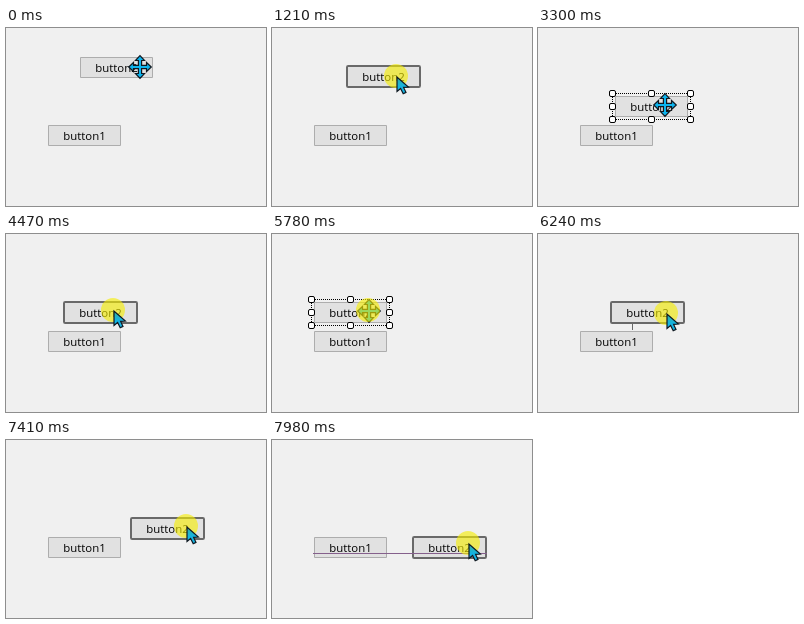
Animation of 260 by 178 pixels, one loop 8 s. Source, as an HTML page with a canvas:

```html
<!DOCTYPE html>
<html lang="en">
<head>
<meta charset="utf-8">
<title>Dragging a button with snap lines</title>
<style>
html, body { margin: 0; width: 100%; height: 100%; overflow: hidden; background: #f0f0f0; }
canvas { display: block; }
</style>
</head>
<body>
<canvas id="stage" width="260" height="178"></canvas>
<script>
const ctx = document.getElementById('stage').getContext('2d');
const LOOP = 8000, W = 75, H = 23, SNAP = 7.5;
const fixed = { x: 41, y: 96 };
const GAP_Y = fixed.y - H - 6;

// The pointer rests between these strokes
const home = { x: 133, y: 38 };
const strokes = [
  { from: 20, to: 130, x: 123, y: 39 },
  { from: 850, to: 1550, x: 124, y: 56 },
  { from: 1700, to: 1880, x: 126, y: 67 },
  { from: 2100, to: 2280, x: 126, y: 71 },
  { from: 3299, to: 3300, x: 126, y: 76 },
  { from: 3930, to: 4770, x: 96, y: 76 },
  { from: 5890, to: 6790, x: 178, y: 84 },
  { from: 7350, to: 7980, x: 196, y: 103 }
];

// x, y: resting place before the drag; dx, dy: grab offset
const drags = [
  { press: 330, from: 870, to: 3300, x: 73, y: 28, dx: 50, dy: 11, gap: true },
  { press: 3940, from: 3940, to: 5410, x: 76, y: GAP_Y, dx: 50, dy: 9, gap: false },
  { press: 5780, from: 5920, to: LOOP, x: fixed.x, y: GAP_Y, dx: 56, dy: 9, gap: true }
];

function pointerAt(t) {
  let { x, y } = home;
  for (const s of strokes) {
    const k = Math.min(1, Math.max(0, (t - s.from) / (s.to - s.from)));
    x += (s.x - x) * k;
    y += (s.y - y) * k;
  }
  return { x: Math.round(x), y: Math.round(y) };
}

function snap(pointer, drag) {
  let x = pointer.x - drag.dx, y = pointer.y - drag.dy;
  const left = Math.abs(x - fixed.x) < SNAP;
  if (left) x = fixed.x;
  const gap = x < fixed.x + W && Math.abs(y - GAP_Y) < SNAP;
  const base = !gap && Math.abs(y - fixed.y) < SNAP;
  if (gap) y = GAP_Y;
  if (base) y = fixed.y;
  return { x, y, left, gap: gap && drag.gap, base };
}

function rect(x, y, w, h, color) {
  ctx.fillStyle = color;
  ctx.fillRect(x, y, w, h);
}

function button(x, y, label, dragged) {
  const inset = dragged ? 1 : 1.5;
  ctx.beginPath();
  ctx.roundRect(x + inset, y + inset, W - 2 * inset, H - 2 * inset, dragged ? 1.2 : 0);
  ctx.fillStyle = '#e1e1e1';
  ctx.fill();
  ctx.lineWidth = dragged ? 2 : 1;
  ctx.strokeStyle = dragged ? '#696969' : '#adadad';
  ctx.stroke();
  ctx.fillStyle = '#000';
  ctx.font = '500 11.4px "Open Sans", "Noto Sans", sans-serif';
  ctx.textAlign = 'center';
  ctx.fillText(label, x + W / 2, y + 16);
}

function selection(x, y) {
  ctx.lineWidth = 1;
  ctx.strokeStyle = '#000';
  ctx.setLineDash([1, 1]);
  ctx.lineDashOffset = 0.5;
  ctx.strokeRect(x - 1.5, y - 1.5, W + 3, H + 3);
  ctx.setLineDash([]);
  ctx.fillStyle = '#fff';
  for (const i of [0, 1, 2]) for (const j of [0, 1, 2]) {
    if (i === 1 && j === 1) continue;
    ctx.beginPath();
    ctx.roundRect(x - 4.5 + i * 39, y - 4.5 + j * 13, 6, 6, 1.5);
    ctx.fill();
    ctx.stroke();
  }
}

function snapLines({ x, y, left, gap, base }) {
  const gray = '#686868';
  if (left) for (const lx of [x, x + W - 1]) rect(lx, y, 1, fixed.y + H - y, gray);
  else if (gap) rect(Math.floor((Math.max(x, fixed.x) + Math.min(x, fixed.x) + W) / 2), y + H, 1, 6, gray);
  if (base) rect(fixed.x, y + 17, x + W - fixed.x, 1, '#85608c');
}

function shape(points, x, y, fill) {
  ctx.beginPath();
  for (const [px, py] of points) ctx.lineTo(x + px, y + py);
  ctx.closePath();
  ctx.fillStyle = fill;
  ctx.strokeStyle = '#101820';
  ctx.lineWidth = 1.2;
  ctx.fill();
  ctx.stroke();
}

const arrow = [[1, 1], [1, 15.5], [4.6, 12.5], [7.2, 17.7], [10, 16.4], [7.6, 11.4], [12.4, 11]];
const arm = [[-1.6, -1.6], [-1.6, -6.5], [-4.5, -6.5], [0, -11.3], [4.5, -6.5], [1.6, -6.5]];
const cross = [0, 1, 2, 3].flatMap(q => arm.map(([x, y]) =>
  [[x, y], [-y, x], [-x, -y], [y, -x]][q]));

function arrowCursor({ x, y }) {
  const fill = ctx.createLinearGradient(x, y, x, y + 18);
  fill.addColorStop(0, '#3aae98');
  fill.addColorStop(0.6, '#14b4e4');
  shape(arrow, x, y, fill);
}

function moveCursor({ x, y }) {
  shape(cross, x + 1, y + 1, '#0cb4ee');
}

function glow({ x, y }) {
  ctx.fillStyle = 'rgba(245, 238, 0, 0.62)';
  ctx.beginPath();
  ctx.arc(x, y, 12, 0, 2 * Math.PI);
  ctx.fill();
}

function draw(now) {
  const t = now % LOOP;
  const pointer = pointerAt(t);
  const drag = drags.find(d => t < d.to);
  const dragging = t >= drag.from;
  const pos = dragging ? snap(pointer, drag) : drag;

  rect(0, 0, 260, 178, '#f0f0f0');
  button(fixed.x, fixed.y, 'button1');
  button(pos.x, pos.y, 'button2', dragging);

  if (dragging) {
    snapLines(pos);
    glow(pointer);
    arrowCursor(pointer);
  } else {
    if (t >= drags[0].press) selection(pos.x, pos.y);
    moveCursor(pointer);
    if (t >= drag.press) glow(pointer);
  }
}

const start = performance.now();
function tick() {
  draw(performance.now() - start);
  requestAnimationFrame(tick);
}
tick();
</script>
</body>
</html>
```
